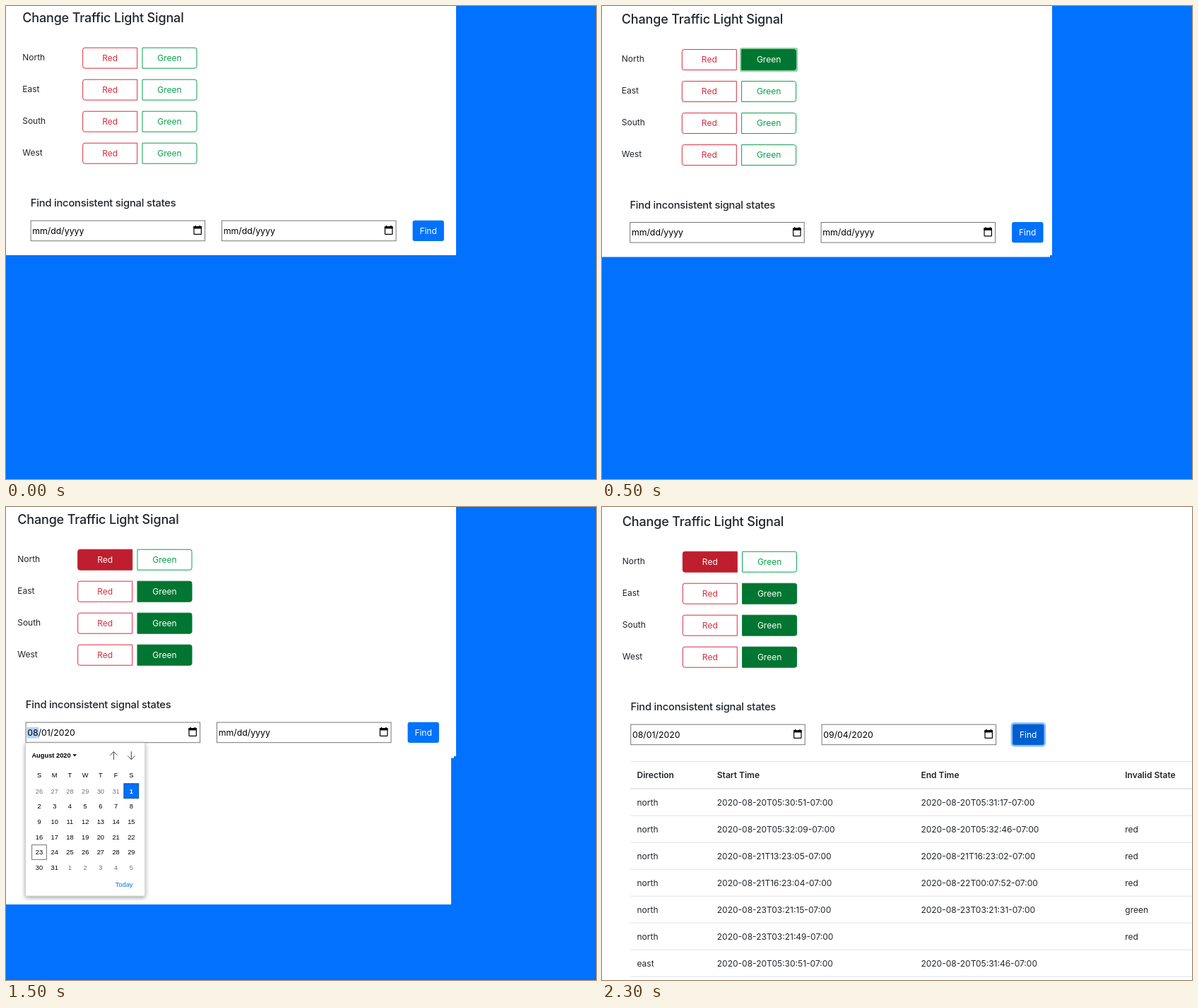
An HTML page for the animation above (2500 ms loop, 835 px wide and 670 px high).

```html
<!DOCTYPE html>
<html lang="en">
<head>
<meta charset="utf-8">
<title>Traffic light signal panel</title>
<style>
  html, body { margin: 0; width: 100%; height: 100%; overflow: hidden; background: #0072fd; }
  svg { display: block; width: 835px; height: 670px; }
  text { font: 12px Inter, Roboto, sans-serif; fill: #212529; white-space: pre; }
  .title { font-size: 18px; font-weight: 500; letter-spacing: -0.16px; }
  .sub { font-size: 14.7px; font-weight: 500; letter-spacing: -0.2px; }
  .date { font-size: 12.3px; fill: #000; }
  .th { font-weight: 600; }
  .cal { font: 9.3px "Liberation Sans", Arial, sans-serif; fill: #000; }
  .bold { font-weight: 700; }
  .mid { text-anchor: middle; }
</style>
</head>
<body>
<svg id="stage" viewBox="0 0 835 670" xmlns="http://www.w3.org/2000/svg">
  <defs>
    <filter id="shadow" x="-20%" y="-20%" width="140%" height="140%">
      <feDropShadow dx="0" dy="2" stdDeviation="3" flood-opacity="0.4"/>
    </filter>
  </defs>
</svg>
<script>
const STEP = 500;
const BLUE = '#0072fd';
const COLORS = {
  Red: { line: '#de2a3d', fill: '#be1e2e', halo: '#f0959f' },
  Green: { line: '#06a149', fill: '#007632', halo: '#92d3a5' },
};
const DIRECTIONS = ['North', 'East', 'South', 'West'];
const EMPTY = 'mm/dd/yyyy';
const SETTLED = ['Red', 'Green', 'Green', 'Green'];

// Page scroll offset, lit signals and date fields of each state
const scenes = [
  { at: [0, 0], lit: [], dates: [EMPTY, EMPTY], paper: [[637, 353]] },
  { at: [4.6, 2.4], lit: ['Green'], focus: true, dates: [EMPTY, EMPTY], paper: [[637, 353], [634, 355.5]] },
  { at: [-18.5, 1], lit: ['Red'], focus: true, dates: [EMPTY, EMPTY], paper: [[637, 353], [634, 355.5]], sliver: true },
  { at: [-7, 1], lit: SETTLED, dates: ['08/01/2020', EMPTY], paper: [[637, 353], [634, 355.5], [630, 563]], picker: true },
  { at: [5.6, 4], lit: SETTLED, dates: ['08/01/2020', '09/04/2020'], paper: [[835, 670]], table: true },
];

const rows = [
  ['north', '2020-08-20T05:30:51-07:00', '2020-08-20T05:31:17-07:00', ''],
  ['north', '2020-08-20T05:32:09-07:00', '2020-08-20T05:32:46-07:00', 'red'],
  ['north', '2020-08-21T13:23:05-07:00', '2020-08-21T16:23:02-07:00', 'red'],
  ['north', '2020-08-21T16:23:04-07:00', '2020-08-22T00:07:52-07:00', 'red'],
  ['north', '2020-08-23T03:21:15-07:00', '2020-08-23T03:21:31-07:00', 'green'],
  ['north', '2020-08-23T03:21:49-07:00', '', 'red'],
  ['east', '2020-08-20T05:30:51-07:00', '2020-08-20T05:31:46-07:00', ''],
];

const rect = (x, y, w, h, fill, extra = '') =>
  `<rect x="${x}" y="${y}" width="${w}" height="${h}" fill="${fill}" ${extra}/>`;
const path = (d, fill, stroke = 'none', width = 1) =>
  `<path d="${d}" fill="${fill}" stroke="${stroke}" stroke-width="${width}"/>`;
const text = (x, y, str, cls = '', color = '') =>
  `<text x="${x}" y="${y}" class="${cls}"${color && ` style="fill:${color}"`}>${str}</text>`;

// Box rounded on one side only, as in a joined button group
function halfRound(x, y, w, h, r, side) {
  return side === 'left'
    ? `M${x + w} ${y}V${y + h}H${x + r}a${r} ${r} 0 0 1 ${-r} ${-r}V${y + r}a${r} ${r} 0 0 1 ${r} ${-r}Z`
    : `M${x} ${y}H${x + w - r}a${r} ${r} 0 0 1 ${r} ${r}V${y + h - r}a${r} ${r} 0 0 1 ${-r} ${r}H${x}Z`;
}

function signalButton(name, row, lit, focus) {
  const x = name === 'Red' ? 108.7 : 193;
  const y = 59.2 + row * 45;
  const c = COLORS[name];
  const halo = lit && focus ? rect(x - 2.6, y - 2.6, 82.2, 34.2, c.halo, 'rx="3"') : '';
  const box = halfRound(x, y, 77, 29, 3, name === 'Red' ? 'left' : 'right');
  return halo + path(box, lit ? c.fill : '#fff', lit ? c.fill : c.line) +
    text(x + 38.5, y + 18.9, name, 'mid', lit ? '#fff' : c.line);
}

function dateField(x, value, selected) {
  const ix = x + 230.3;
  return rect(x, 304.1, 246.5, 28.6, '#fff', 'stroke="#767676"') +
    (selected ? rect(x + 1.4, 311, 17, 15.6, '#b1d4fc') : '') +
    text(x + 2.2, 322.8, value, 'date') +
    rect(ix + .6, 312.6, 10.4, 10.8, 'none', 'stroke="#000" stroke-width="1.2" rx=".6"') +
    rect(ix, 312, 11.6, 3.4, '#000') +
    rect(ix + 1.9, 310.8, 1.4, 2, '#000') + rect(ix + 8.3, 310.8, 1.4, 2, '#000');
}

function panel({ at, lit, focus, dates, picker, table }) {
  let out = text(23.2, 23, 'Change Traffic Light Signal', 'title');
  DIRECTIONS.forEach((dir, i) => {
    out += text(23.2, 76.5 + i * 45, dir);
    for (const name of ['Red', 'Green']) out += signalButton(name, i, lit[i] === name, focus);
  });
  out += text(34.8, 284.4, 'Find inconsistent signal states', 'sub');
  out += dateField(35.1, dates[0], picker) + dateField(305.5, dates[1]);
  if (table) out += rect(573, 301.2, 49.4, 34.2, '#84bcff', 'rx="4.5"');
  out += rect(575.5, 303.7, 44.4, 29.2, table ? '#005fd0' : BLUE, 'rx="3"');
  out += text(597.6, 322.7, 'Find', 'mid', '#fff');
  return `<g transform="translate(${at})">${out}</g>`;
}

function calendar() {
  const pitch = 21.72;
  let out = rect(27.8, 334, 169, 217, '#fff', 'stroke="#bbb" stroke-width=".6" filter="url(#shadow)"');
  out += text(36.4, 354.8, 'August 2020', 'cal bold') + path('M94.4 350.2h5.6l-2.8 3.2Z', '#000');
  out += path('M152.4 358V346.6m-5.2 5.2l5.2-5.2l5.2 5.2M177.3 346.2V357.6m-5.2-5.2l5.2 5.2l5.2-5.2', 'none', '#333', .9);
  [...'SMTWTFS'].forEach((d, i) => out += text(47 + i * pitch, 383.3, d, 'cal mid'));
  out += rect(166.9, 391.8, 20.8, 20.8, '#0070fa', 'stroke="#0a4fa8"');
  out += rect(36.6, 478.6, 20.8, 20.8, '#fff', 'stroke="#767676"');
  for (let i = 0; i < 42; i++) {
    const day = i - 5;
    const label = day < 1 ? day + 31 : day > 31 ? day - 31 : day;
    const color = day === 1 ? '#fff' : day === label ? '#000' : '#757575';
    out += text(47 + i % 7 * pitch, 405.6 + Math.floor(i / 7) * pitch, label,
      day === 1 ? 'cal mid bold' : 'cal mid', color);
  }
  return out + text(154.7, 538.3, 'Today', 'cal', '#0b74d1');
}

function results() {
  const cols = [49.5, 162.8, 451.4, 740.3];
  const line = (y, h) => rect(40.3, y, 795, h, '#dee2e6');
  const cells = (list, y, cls) => list.map((s, i) => text(cols[i], y, s, cls)).join('');
  return line(360, 1) + line(398.2, 1.6) +
    cells(['Direction', 'Start Time', 'End Time', 'Invalid State'], 384.3, 'th') +
    rows.map((r, i) => cells(r, 422.8 + i * 38, '') + line(436.7 + i * 38, 1)).join('');
}

function draw(scene) {
  let out = rect(0, 0, 835, 670, BLUE);
  out += scene.paper.map(([w, h]) => rect(0, 0, w, h, '#fff')).join('');
  if (scene.sliver) out += path(halfRound(616, 306, 8.4, 29.2, 3, 'right'), BLUE);
  out += panel(scene);
  if (scene.picker) out += calendar();
  if (scene.table) out += results();
  return out;
}

const stage = document.getElementById('stage');
scenes.forEach((scene, i) => {
  const g = document.createElementNS(stage.namespaceURI, 'g');
  g.innerHTML = draw(scene);
  stage.append(g);
  const n = scenes.length;
  const frames = [[0, 0], [i / n, 1], [(i + 1) / n, 0], [1, 0]]
    .map(([offset, opacity]) => ({ offset, opacity, easing: 'step-end' }));
  g.animate(frames, { duration: STEP * n, iterations: Infinity });
});
</script>
</body>
</html>
```
